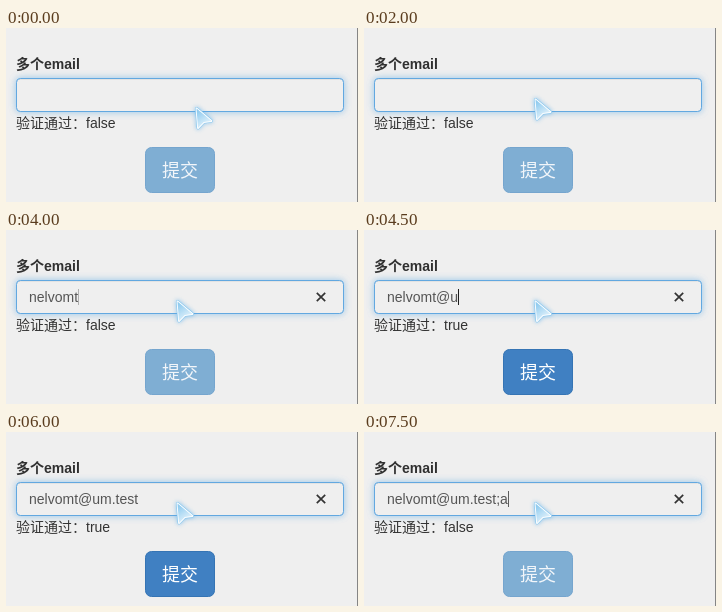
An HTML page with a canvas for the animation above (8000 ms loop, 352x174 px).

```html
<!DOCTYPE html>
<html lang="zh">
<head>
<meta charset="utf-8">
<title>多个email</title>
<style>
html, body { margin: 0; width: 100%; height: 100%; overflow: hidden; background: #efefef; }
canvas { display: block; }
</style>
</head>
<body>
<canvas id="stage" width="352" height="174"></canvas>
<script>
const ctx = document.getElementById('stage').getContext('2d');
const FONT = '"Liberation Sans", Arial, "Noto Sans CJK SC", "Noto Sans CJK", sans-serif';
const LOOP = 8000;
const ADDRESS = 'nelvomt@um.test;a';

// [start time, characters typed, caret opacity]
const TYPING = [
  [0, 0, 0], [500, 0, 1], [1000, 0, 0], [1500, 0, 1], [2000, 0, 0],
  [3000, 3, 1], [3500, 7, 1], [4000, 7, 0.3], [4500, 9, 1],
  [5000, 12, 1], [5500, 15, 1], [6000, 15, 0], [6500, 16, 1],
  [7000, 16, 0], [7500, 17, 0.7]
];

function text(str, x, y, size, color, weight = 'normal') {
  ctx.font = `${weight} ${size}px ${FONT}`;
  ctx.fillStyle = color;
  ctx.fillText(str, x, y);
}

function box(x, y, w, h, r, fill, stroke) {
  ctx.beginPath();
  ctx.roundRect(x + 0.5, y + 0.5, w - 1, h - 1, r);
  ctx.fillStyle = fill;
  ctx.fill();
  ctx.strokeStyle = stroke;
  ctx.lineWidth = 1;
  ctx.stroke();
}

function drawInput(typed, caret) {
  ctx.save();
  ctx.shadowColor = 'rgba(102,175,233,0.6)';
  ctx.shadowBlur = 6;
  box(10, 50, 328, 34, 4, '#efefef', '#66afe9');
  ctx.restore();
  box(10, 50, 328, 34, 4, '#efefef', '#62a8e0');
  ctx.fillStyle = 'rgba(0,0,0,0.05)';
  ctx.fillRect(13, 51, 322, 1);

  text(typed, 23, 72, 14, '#555');
  const caretX = Math.round(23 + ctx.measureText(typed).width);
  ctx.fillStyle = `rgba(30,30,30,${caret})`;
  ctx.fillRect(caretX, 59, 1, 16);

  if (typed) {
    ctx.beginPath();
    ctx.moveTo(310.8, 62.8);
    ctx.lineTo(319.2, 71.2);
    ctx.moveTo(319.2, 62.8);
    ctx.lineTo(310.8, 71.2);
    ctx.strokeStyle = '#333';
    ctx.lineWidth = 1.7;
    ctx.stroke();
  }
}

function drawButton(enabled) {
  box(139, 119, 70, 46, 6, enabled ? '#4080c2' : '#7faed3', enabled ? '#3574b4' : '#75a5ce');
  text('提交', 156, 149, 18, enabled ? '#fff' : '#f2f6fa');
}

function drawPointer(x, y) {
  ctx.save();
  ctx.translate(x, y);
  ctx.beginPath();
  ctx.moveTo(0.5, 0.5);
  ctx.lineTo(15.5, 13);
  ctx.lineTo(7.8, 14);
  ctx.lineTo(2, 20);
  ctx.closePath();
  ctx.lineJoin = 'round';
  ctx.shadowColor = 'rgba(90,175,235,0.75)';
  ctx.shadowBlur = 4;
  ctx.strokeStyle = '#8cc8ee';
  ctx.lineWidth = 3;
  ctx.stroke();
  ctx.shadowBlur = 0;
  ctx.strokeStyle = '#fff';
  ctx.lineWidth = 1.8;
  ctx.stroke();
  const shade = ctx.createLinearGradient(0, 4, 9, 17);
  shade.addColorStop(0, '#8fcbef');
  shade.addColorStop(1, '#dceffa');
  ctx.fillStyle = shade;
  ctx.fill();
  ctx.restore();
}

function render(t) {
  const [, count, caret] = TYPING.findLast(step => step[0] <= t);
  const valid = t >= 4500 && t < 7500;

  ctx.fillStyle = '#efefef';
  ctx.fillRect(0, 0, 352, 174);
  ctx.fillStyle = '#858585';
  ctx.fillRect(351, 0, 1, 174);

  text('多个email', 10, 41, 14, '#303030', 'bold');
  drawInput(ADDRESS.slice(0, count), caret);
  text('验证通过：' + valid, 10, 100, 14, '#333');
  drawButton(valid);
  if (t < 500) drawPointer(190, 80);
  else drawPointer(171, 71);
}

function frame() {
  render(performance.now() % LOOP);
  requestAnimationFrame(frame);
}
frame();
</script>
</body>
</html>
```
